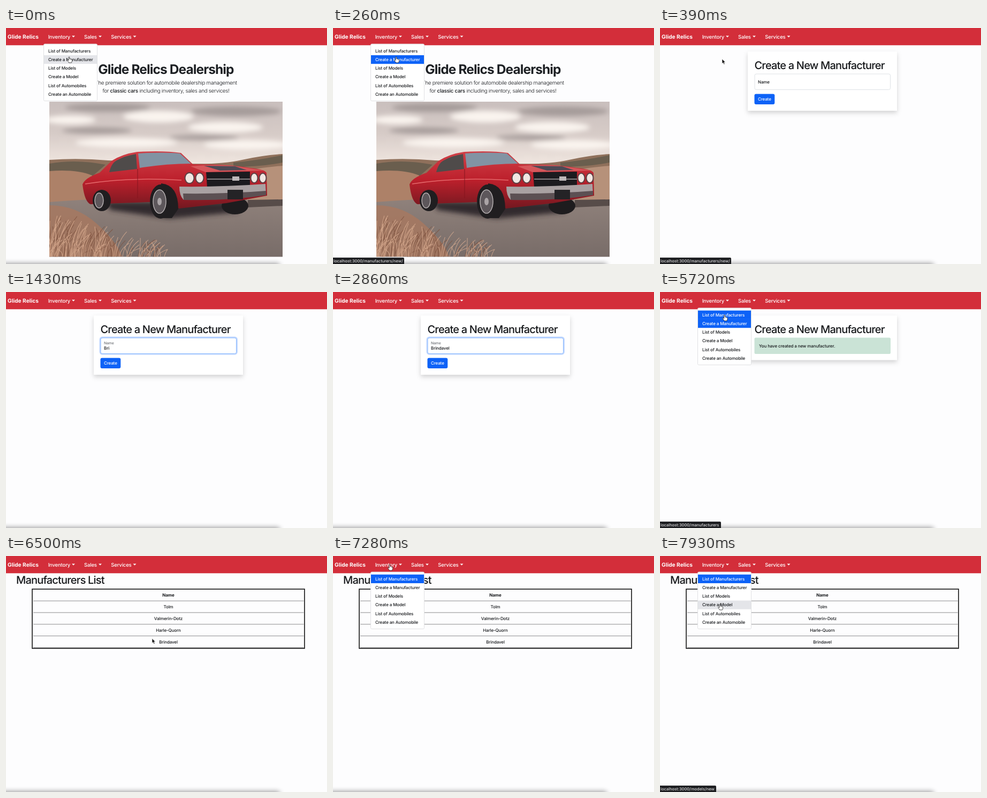
An HTML page for the animation above (8000 ms loop, 600 px wide and 442 px high).

```html
<!DOCTYPE html>
<html lang="en">
<head>
<meta charset="utf-8">
<title>Dealership walkthrough</title>
<style>
  html, body { margin: 0; width: 100%; height: 100%; overflow: hidden; background: #fdfdfe; }
  svg { display: block; width: 600px; height: 442px; }
  text { font: 450 8px Inter, "Open Sans", sans-serif; letter-spacing: -.016em; fill: #16181b;
         text-rendering: geometricPrecision; white-space: pre; }
  .nav { font-size: 9.6px; letter-spacing: -.022em; fill: #fff; }
  .brand { font-size: 10.2px; font-weight: 700; letter-spacing: 0; fill: #fff; }
  .h1 { font-size: 20px; font-weight: 500; letter-spacing: -.041em; }
  .hero { font-size: 24.5px; font-weight: 700; letter-spacing: -.037em; fill: #1d2024; }
  .lead { font-size: 9.9px; font-weight: 350; letter-spacing: -.03em; }
  .lead tspan { font-weight: 500; }
  .mid { text-anchor: middle; }
  .bold { font-weight: 700; }
  .white { fill: #fff; }
  .float { font-size: 6.8px; fill: #6b6f74; }
  .status { font-size: 7.5px; letter-spacing: 0; fill: #dcdcde; }
  .card { fill: #fff; filter: drop-shadow(0 4px 4px rgba(0, 0, 0, .17)); }
  .menu { fill: #fff; stroke: #e0e1e3; }
  .blue { fill: #0d62f7; }
  .blades { fill: none; stroke-width: 1.1; opacity: .7; }
</style>
</head>
<body>
<svg viewBox="0 0 600 442">
  <defs>
    <linearGradient id="sky" x2="0" y2="1">
      <stop offset="0" stop-color="#c9bfbd"/><stop offset=".45" stop-color="#d6cbc7"/>
      <stop offset="1" stop-color="#f6ece5"/>
    </linearGradient>
    <linearGradient id="road" x2="0" y2="1">
      <stop offset="0" stop-color="#8f817b"/><stop offset="1" stop-color="#786c68"/>
    </linearGradient>
    <linearGradient id="paint" x2="0" y2="1">
      <stop offset="0" stop-color="#cf4148"/><stop offset=".5" stop-color="#bd202c"/>
      <stop offset="1" stop-color="#741820"/>
    </linearGradient>
    <filter id="soft" filterUnits="userSpaceOnUse" x="-60" y="100" width="720" height="400">
      <feGaussianBlur stdDeviation="5"/>
    </filter>
    <clipPath id="photo"><path d="M81 138h436v290.500h-436z"/></clipPath>
  </defs>
  <rect width="600" height="442" fill="#fdfdfe"/>

  <g id="home">
    <text class="hero mid" x="299" y="85.500">Glide Relics Dealership</text>
    <text class="lead mid" x="299" y="106.300">The premiere solution for automobile dealership management</text>
    <text class="lead mid" x="299" y="121.300">for <tspan>classic cars</tspan> including inventory, sales and services!</text>
    <g clip-path="url(#photo)">
      <rect x="81" y="138" width="436" height="130" fill="url(#sky)"/>
      <g filter="url(#soft)">
        <g fill="#faf4ef">
          <ellipse cx="120" cy="172" rx="48" ry="8"/><ellipse cx="285" cy="166" rx="66" ry="11"/>
          <ellipse cx="410" cy="186" rx="70" ry="10"/><ellipse cx="225" cy="215" rx="95" ry="9"/>
          <ellipse cx="450" cy="219" rx="80" ry="9"/>
        </g>
        <g fill="#a59b9a">
          <ellipse cx="190" cy="149" rx="80" ry="8"/><ellipse cx="430" cy="156" rx="85" ry="9"/>
          <ellipse cx="170" cy="192" rx="65" ry="6"/><ellipse cx="370" cy="205" rx="65" ry="5"/>
        </g>
      </g>
      <path d="M81 247q55-4 110 1l150 6q60 2 100-7t76-11v100h-436z" fill="#8f705b"/>
      <path d="M81 254q50-9 105 2l-25 22h-80zM425 252q45-4 92-14v14q-40 8-92 8z" fill="#6a5e4e"/>
      <path d="M81 268q50-4 80 8v54h-80z" fill="#ad8168"/>
      <path d="M450 267q30-6 67-9v64h-67z" fill="#b6917a"/>
      <path d="M81 326q90-8 180-4h256v107h-436z" fill="url(#road)"/>
      <path d="M452 322l65-1v12l-65 3z" fill="#574c49"/>
      <path d="M81 332q50 0 88 34t48 62h-136z" fill="#a9795f" opacity=".8"/>
      <path d="M185 325h230l20 20-130 12-110-16z" fill="#332c2d" filter="url(#soft)"/>
      <ellipse cx="428" cy="333" rx="25" ry="16" fill="#1e1c1e"/>
      <path d="M143 293q4-12 32-22l22-22q20-13 48-17 50-3 82 2l22 21q70 0 106 7 31 3 32 10l1 42-76 14-88 10-56-12-110 4q-11-4-15-37z" fill="url(#paint)"/>
      <path d="M193 270q4-17 14-22 16-9 36-12l2 28z" fill="#4f4b4a"/>
      <path d="M247 235q50-3 78 0l21 19q-46 0-96 8z" fill="#8293a3"/>
      <path d="M345 259q55-5 92 1l46 7-110 3z" fill="#d6575b"/>
      <path d="M370 258l58 1 22 7-50 1z" fill="#4d4a55"/>
      <path d="M148 292q80-13 180-7" fill="none" stroke="#e4686b" stroke-width="1.500"/>
      <path d="M246 264v55" stroke="#84141f"/>
      <path d="M374 270l82-1v26l-80 3z" fill="#1c1b1f"/>
      <path d="M376 283h80" stroke="#aaa3a5" stroke-width="1.500"/>
      <rect x="423" y="278" width="13" height="8" fill="#bdb8b9"/>
      <path d="M324 297q80 1 161-5l1 20q-70 10-154 10-8-8-8-25z" fill="#a9a1a2"/>
      <path d="M331 310q80 1 155-5v8q-70 11-154 9z" fill="#5c5053"/>
      <rect x="414" y="303" width="29" height="18" fill="#242326"/>
      <g fill="#f1e7e2" stroke="#5c4145" stroke-width="2">
        <ellipse cx="343" cy="281" rx="8.500" ry="10"/><ellipse cx="362" cy="281" rx="7.500" ry="9.500"/>
        <ellipse cx="464" cy="281" rx="6.500" ry="9"/><ellipse cx="480" cy="281" rx="6.500" ry="9"/>
      </g>
      <g fill="#201e20">
        <ellipse cx="179" cy="323" rx="17" ry="20"/>
        <path d="M290 291q32 3 32 48l-12 17h-22z"/><ellipse cx="289" cy="325" rx="20" ry="32"/>
      </g>
      <g fill="#5d575b" stroke="#b5afb0" stroke-width="1.500">
        <ellipse cx="174" cy="323" rx="8" ry="14"/><ellipse cx="287" cy="325" rx="12" ry="22"/>
      </g>
      <ellipse cx="287" cy="325" rx="4" ry="7" fill="#aaa4a6"/>
      <path id="darkGrass" class="blades" stroke="#7c503c"/>
      <path id="paleGrass" class="blades" stroke="#deb195"/>
    </g>
  </g>

  <g id="form">
    <rect id="card" class="card" x="164" y="44" width="279" height="111"/>
    <text class="h1" x="176.500" y="77">Create a New Manufacturer</text>
    <g id="fields">
      <rect id="ring" x="176" y="85" width="255.500" height="31" rx="4" fill="none" stroke="#c2d8ff" stroke-width="3"/>
      <rect id="input" x="177" y="86" width="253.500" height="29.500" rx="3" fill="#fff"/>
      <text id="label" x="183">Name</text>
      <text id="typed" x="183" y="107.800"></text>
      <rect class="blue" x="176.500" y="123.500" width="37.800" height="19.500" rx="3"/>
      <text class="white" x="183" y="136.200">Create</text>
    </g>
    <g id="done">
      <rect x="176.500" y="85.500" width="254.500" height="30.500" rx="2.500" fill="#cae3d6"/>
      <text x="185" y="103.600">You have created a new manufacturer.</text>
    </g>
  </g>

  <g id="list">
    <text class="h1" x="19" y="52.300">Manufacturers List</text>
    <rect x="49" y="62" width="509" height="111" fill="none" stroke="#111" stroke-width="1.600"/>
    <g id="rows"></g>
  </g>

  <rect x="-20" y="441" width="531" height="20" filter="url(#soft)" opacity=".42"/>

  <rect width="600" height="32.300" fill="#d32e3a"/>
  <text class="brand" x="3" y="20.200">Glide Relics</text>
  <text class="nav" x="78.700" y="20">Inventory</text>
  <text class="nav" x="146" y="20">Sales</text>
  <text class="nav" x="196.300" y="20">Services</text>
  <path d="M123 14.500h6l-3 3zM173 14.500h6l-3 3zM237.500 14.500h6l-3 3z" fill="#fff"/>

  <g id="menu"><rect class="menu" x="70.500" y="30" width="100" height="106.500" rx="2"/></g>

  <g id="status">
    <path id="bar" fill="#1f2023"/>
    <text id="link" class="status" x="1" y="439.300"></text>
  </g>

  <g id="cursor">
    <path id="arrow" d="M0 0v8.800l2-1.900 1.500 3.300 1.600-.7-1.500-3.200h2.800z" fill="#111" stroke="#fff" stroke-width=".7"/>
    <path id="hand" d="M-.9 .9q0-.9.9-.9t.9.900v3q1.200-.5 1.700.4 1.200-.3 1.600.6 1.400-.2 1.400 1v1.700q0 1.500-1 2.600v.8h-5.100l-.4-1q-1.300-1.500-2.300-3.200-.4-1 .5-1.200.8-.1 1.800 1.200z" fill="#fff" stroke="#222" stroke-width=".8"/>
  </g>
</svg>
<script>
const LOOP = 8000, STEP = 130, NAME = "Brindavel";
const $ = id => document.getElementById(id);
const show = (id, on) => { $(id).style.display = on ? "" : "none"; };
const add = (parent, tag, attrs, text = "") => {
  const el = document.createElementNS("http://www.w3.org/2000/svg", tag);
  for (const k in attrs) el.setAttribute(k, attrs[k]);
  el.textContent = text;
  return parent.appendChild(el);
};

const ITEM_TOP = 34.7, ITEM_H = 16.25;
const items = ["List of Manufacturers", "Create a Manufacturer", "List of Models",
  "Create a Model", "List of Automobiles", "Create an Automobile"].map((label, i) => {
  const y = ITEM_TOP + i * ITEM_H;
  return {
    box: add($("menu"), "rect", { x: 71, y, width: 99, height: ITEM_H }),
    text: add($("menu"), "text", { x: 79, y: y + 11 }, label)
  };
});

["Name", "Tolm", "Valmerin-Dotz", "Harle-Quorn", NAME].forEach((name, i) => {
  const y = 76.4 + i * 21.87;
  add($("rows"), "text", { x: 303.5, y, class: i ? "mid" : "mid bold" }, name);
  add($("rows"), "path", { d: `M51 ${y + 7.7}H556.5`, stroke: "#8b8b8d", "stroke-width": 1 });
});

let seed = 7;
const rand = () => (seed = seed * 16807 % 2147483647) / 2147483647;
function growGrass(id, count) {
  let d = "";
  for (let i = 0; i < count; i++) {
    const x = 78 + 220 * rand() ** 1.8, h = 15 + 70 * rand() * (330 - x) / 250, lean = 36 * rand() - 8;
    d += `M${x} 430q2 ${-h * .6} ${lean} ${-h}`;
  }
  $(id).setAttribute("d", d);
}
growGrass("darkGrass", 60);
growGrass("paleGrass", 90);

// Pointer tip: time, x, y
const path = [
  [0, 118, 54], [260, 118, 54], [390, 116, 58], [520, 116, 58], [780, 212, 98],
  [2990, 226, 104], [3250, 232, 144], [3640, 200, 134], [3900, 200, 134],
  [4420, 105.5, 92], [4810, 104, 16], [5200, 104, 16], [5460, 118, 36],
  [5720, 120.5, 43], [5850, 120.5, 43], [6370, 273, 154.5], [6630, 273, 154.5],
  [7150, 106, 16], [7410, 106, 16], [7800, 111, 86], [7930, 112, 90]
];
const links = [
  [130, 780, "manufacturers/new/", 133],
  [5590, 6240, "manufacturers", 114],
  [7800, LOOP, "models/new", 105]
];
const within = (t, ...spans) => spans.some(([a, b]) => t >= a && t < b);

function pointerAt(t) {
  const i = path.findIndex(p => p[0] > t);
  if (i < 0) return path[path.length - 1].slice(1);
  const [t0, x0, y0] = path[i - 1], [t1, x1, y1] = path[i];
  const u = (t - t0) / (t1 - t0), e = u * u * (3 - 2 * u);
  return [x0 + (x1 - x0) * e, y0 + (y1 - y0) * e];
}

function drawForm(t) {
  const focus = t >= 780, sent = t >= 3900;
  show("fields", !sent);
  show("done", sent);
  show("ring", focus);
  $("card").setAttribute("height", sent ? 83.5 : 111);
  $("input").setAttribute("stroke", focus ? "#86b7fe" : "#dee2e6");
  $("label").setAttribute("class", focus ? "float" : "");
  $("label").setAttribute("y", focus ? 97.5 : 103.8);
  const count = Math.max(0, Math.floor((t - 1040) / 190) + 1);
  $("typed").textContent = NAME.slice(0, count);
}

function drawMenu(t, y, page) {
  show("menu", within(t, [0, 390], [4940, 5850], [7280, LOOP]));
  const hover = Math.floor((y - ITEM_TOP) / ITEM_H);
  const pressed = within(t, [260, 390], [5720, 5850]);
  const current = { form: 1, list: 0 }[page];
  items.forEach(({ box, text }, i) => {
    const blue = i === current || (pressed && i === hover);
    box.setAttribute("fill", blue ? "#0d62f7" : i === hover ? "#e4e5e9" : "none");
    text.setAttribute("class", blue ? "white" : "");
  });
}

function draw(t) {
  const page = t < 390 ? "home" : t < 5850 ? "form" : "list";
  for (const id of ["home", "form", "list"]) show(id, id === page);
  drawForm(t);

  const [x, y] = pointerAt(t);
  drawMenu(t, y, page);

  const link = links.find(([a, b]) => within(t, [a, b]));
  show("status", link);
  if (link) {
    $("link").textContent = "localhost:3000/" + link[2];
    $("bar").setAttribute("d", `M0 430H${link[3] - 2}q2 0 2 2V442H0z`);
  }

  const hand = within(t, [0, 390], [3510, 3900], [4810, 5850], [7150, LOOP]);
  show("cursor", !within(t, [910, 2990]));
  show("hand", hand);
  show("arrow", !hand);
  $("cursor").setAttribute("transform", `translate(${x} ${y})`);
}

const start = performance.now();
function tick() {
  const t = Math.max(0, performance.now() - start) % LOOP;
  draw(Math.floor(t / STEP) * STEP);
  requestAnimationFrame(tick);
}
tick();
</script>
</body>
</html>
```
